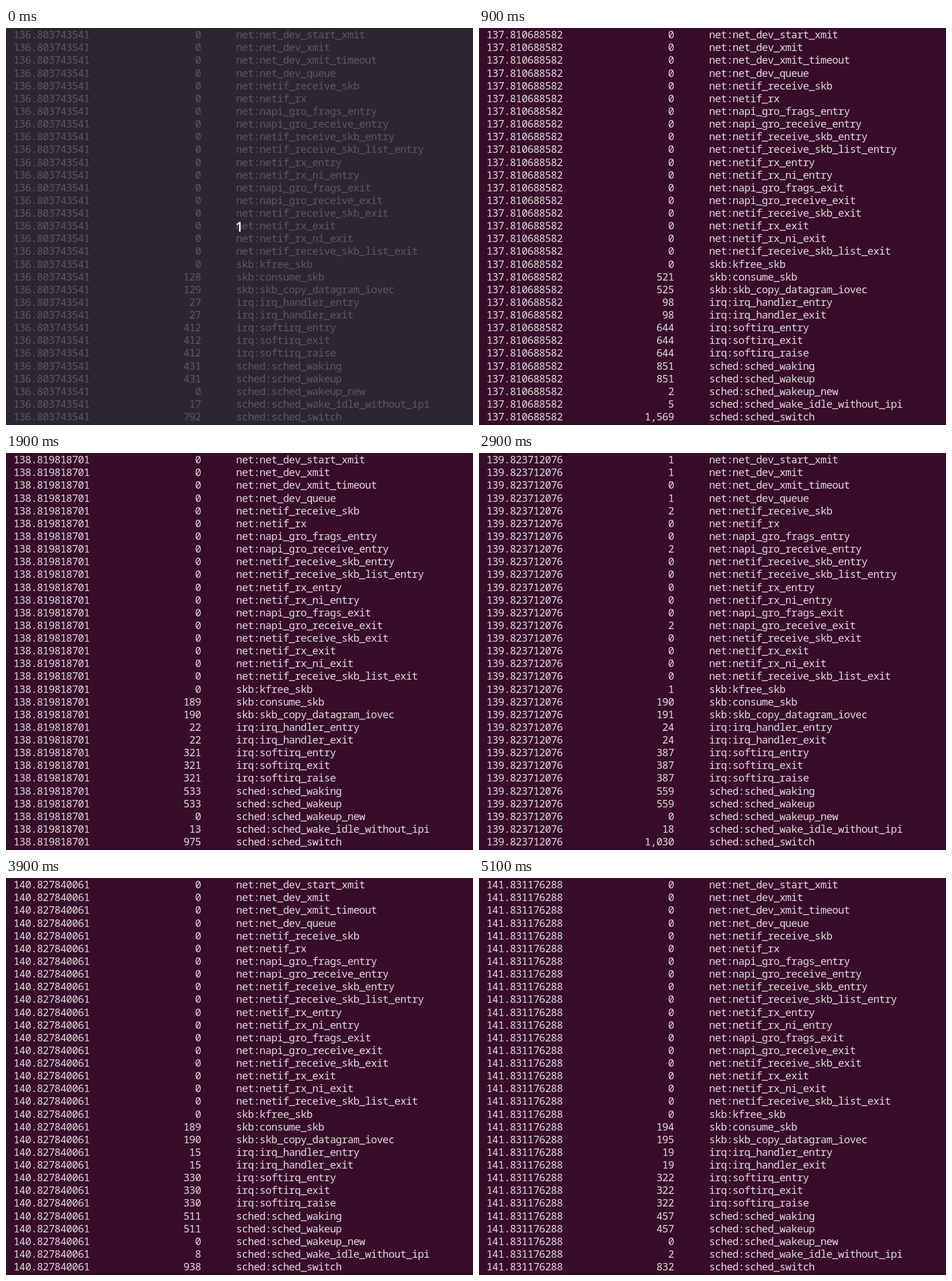
Recreate the animation shown at these times as an HTML page. Size 812 by 690 pixels, loop 5500 ms.

```html
<!DOCTYPE html>
<html lang="en">
<head>
<meta charset="utf-8">
<title>Event counters</title>
<style>
  html, body { margin: 0; width: 100%; height: 100%; overflow: hidden; background: #390c2b; }
  svg { display: block; width: 812px; height: 690px; }
  .rows { font: 18px "Noto Sans Mono", "DejaVu Sans Mono", monospace; letter-spacing: -0.61px; }
  .count { font: 600 24px "Open Sans", "Noto Sans", sans-serif; fill: #f4f2f4; text-anchor: middle; }
</style>
</head>
<body>
<svg viewBox="0 0 812 690" xmlns="http://www.w3.org/2000/svg">
  <rect id="back" width="812" height="690"/>
  <rect id="edge" y="688" width="812" height="2"/>
  <g id="rows" class="rows"></g>
  <text id="count" class="count" x="405.5" y="353.5">1</text>
</svg>
<script>
const LOOP = 5500, INTRO = 100;
const CELL = 10.19, LEFT = 12.9, PITCH = 22.13, BASE = 18.2;
const VALUE_END = 32, NAME_START = 38;

const groups = {
  net: `net_dev_start_xmit net_dev_xmit net_dev_xmit_timeout net_dev_queue
    netif_receive_skb netif_rx napi_gro_frags_entry napi_gro_receive_entry
    netif_receive_skb_entry netif_receive_skb_list_entry netif_rx_entry
    netif_rx_ni_entry napi_gro_frags_exit napi_gro_receive_exit
    netif_receive_skb_exit netif_rx_exit netif_rx_ni_exit netif_receive_skb_list_exit`,
  skb: "kfree_skb consume_skb skb_copy_datagram_iovec",
  irq: "irq_handler_entry irq_handler_exit softirq_entry softirq_exit softirq_raise",
  sched: "sched_waking sched_wakeup sched_wakeup_new sched_wake_idle_without_ipi sched_switch"
};
const events = Object.entries(groups).flatMap(([group, names]) =>
  names.split(/\s+/).map(name => `${group}:${name}`));

// One load reading per refresh; every counter follows from it.
const samples = [
  { at: 0, stamp: "136.803743541", skb: 128, irq: 27, soft: 412, wake: 431, idle: 17, switches: 792 },
  { at: 900, stamp: "137.810688582", skb: 521, irq: 98, soft: 644, wake: 851, idle: 5, switches: 1569 },
  { at: 1900, stamp: "138.819818701", skb: 189, irq: 22, soft: 321, wake: 533, idle: 13, switches: 975 },
  { at: 2900, stamp: "139.823712076", skb: 190, irq: 24, soft: 387, wake: 559, idle: 18, switches: 1030, packets: 1 },
  { at: 3900, stamp: "140.827840061", skb: 189, irq: 15, soft: 330, wake: 511, idle: 8, switches: 938 },
  { at: 5100, stamp: "141.831176288", skb: 194, irq: 19, soft: 322, wake: 457, idle: 2, switches: 832 }
];

// The first matching pattern decides how an event is counted.
const rules = [
  [/start_xmit|dev_xmit$|dev_queue|kfree/, s => s.packets ?? 0],
  [/netif_receive_skb$|gro_receive/, s => 2 * (s.packets ?? 0)],
  [/consume/, s => s.skb],
  [/copy_datagram/, s => s.skb + Math.round(s.skb / 130)],
  [/irq_handler/, s => s.irq],
  [/softirq/, s => s.soft],
  [/wakeup_new/, s => Math.floor(s.skb / 260)],
  [/waking|wakeup/, s => s.wake],
  [/wake_idle/, s => s.idle],
  [/switch/, s => s.switches],
  [/./, () => 0]
];
const counterFor = name => rules.find(([pattern]) => pattern.test(name))[1];

const byId = id => document.getElementById(id);
const back = byId("back"), edge = byId("edge"), rows = byId("rows"), count = byId("count");

function addText(row) {
  const node = document.createElementNS("http://www.w3.org/2000/svg", "text");
  node.setAttribute("y", BASE + row * PITCH);
  return rows.appendChild(node);
}

function setText(node, column, text) {
  node.setAttribute("x", LEFT + column * CELL);
  node.textContent = text;
}

const lines = events.map((name, row) => {
  setText(addText(row), NAME_START, name);
  return { stamp: addText(row), value: addText(row), counter: counterFor(name) };
});

let shown;
function showSample(sample) {
  if (sample === shown) return;
  shown = sample;
  for (const { stamp, value, counter } of lines) {
    const text = counter(sample).toLocaleString("en-US");
    setText(stamp, 0, sample.stamp);
    setText(value, VALUE_END - text.length, text);
  }
}

function draw(time) {
  const dim = time < INTRO;
  back.setAttribute("fill", dim ? "#2c2630" : "#390c2b");
  edge.setAttribute("fill", dim ? "#28222c" : "#300a25");
  rows.setAttribute("fill", dim ? "#5c5760" : "#dedadd");
  count.setAttribute("visibility", dim ? "visible" : "hidden");
  showSample(samples.findLast(sample => time >= sample.at));
}

const start = performance.now();
function tick() {
  draw((performance.now() - start) % LOOP);
  requestAnimationFrame(tick);
}
tick();
</script>
</body>
</html>
```
